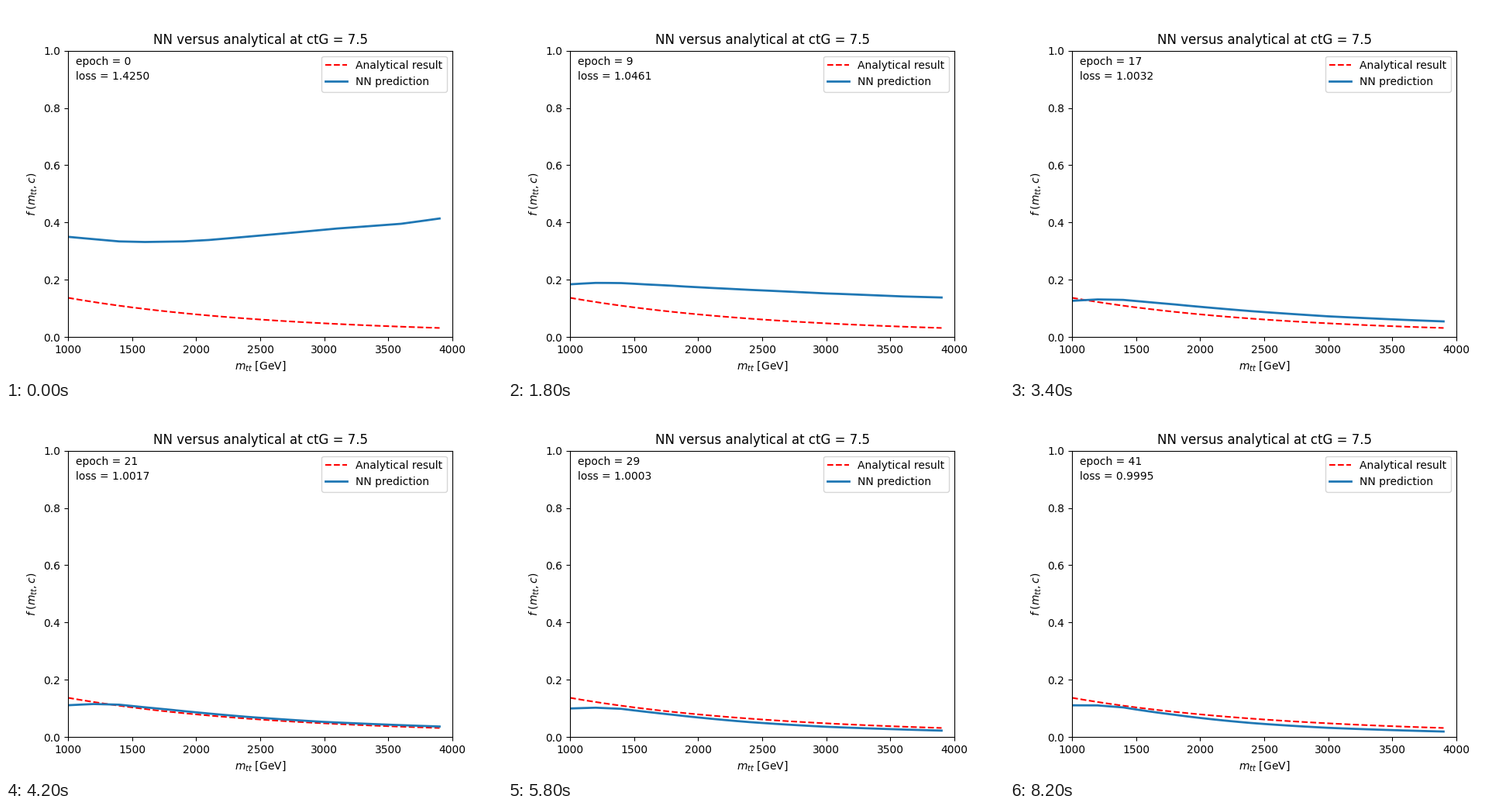
Recreate the animation shown at these times as a matplotlib script. Size 640 by 480 pixels, loop 8400 ms.

```python
import numpy as np
import matplotlib.pyplot as plt
from matplotlib.animation import FuncAnimation

EPOCHS = 42
STEP_MS = 200
LOSS_FLOOR = 0.99

mass = np.arange(1000, 4000, 100.0)
u = (mass - 1000) / 1000


def log_interp(x, xk, yk):
    return np.interp(x, xk, np.log(yk))


analytical = 0.1372 * np.exp(-0.572 * u + 0.0235 * u ** 2)

# Untrained and trained network: straight pieces, as from ReLU units
untrained = log_interp(mass, [1000, 1400, 1600, 1900, 2100, 3100, 3600, 3900],
                       [0.350, 0.334, 0.332, 0.334, 0.339, 0.379, 0.3956, 0.414])
trained = log_interp(mass, [1000, 1200, 1400, 1800, 2400, 3000, 3900],
                     [0.1107, 0.1104, 0.1034, 0.0777, 0.0490, 0.0322, 0.0193])


def prediction(epoch):
    """Fade from untrained to trained; low masses overshoot on the way."""
    remaining = np.exp(-0.043 * epoch - 6.8e-5 * epoch ** 3)
    overshoot = 0.265 * np.exp(-u) * np.sin(np.pi * (epoch / (EPOCHS - 1)) ** 0.7)
    return np.exp(trained + remaining * (untrained - trained) - overshoot)


def loss(epoch):
    above = np.array([1.4250, 1.1624, 1.0461, 1.0032, 1.0003, 1.0004, 0.9995]) - LOSS_FLOOR
    return LOSS_FLOOR + np.exp(log_interp(epoch, [0, 4, 9, 17, 25, 33, 41], above))


fig, ax = plt.subplots(figsize=(6.4, 4.8), dpi=100)
ax.plot(mass, analytical, "r--", label="Analytical result")
line, = ax.plot(mass, prediction(0), lw=2, color="C0", label="NN prediction")
epoch_text = ax.text(0.02, 0.95, "", transform=ax.transAxes)
loss_text = ax.text(0.02, 0.90, "", transform=ax.transAxes)
ax.set(xlim=(1000, 4000), ylim=(0, 1),
       xlabel=r"$m_{tt}$ [GeV]", ylabel=r"$f\;(m_{tt}, c)$",
       title="NN versus analytical at ctG = 7.5")
ax.legend(loc="upper right")


def update(epoch):
    line.set_ydata(prediction(epoch))
    epoch_text.set_text(f"epoch = {epoch}")
    loss_text.set_text(f"loss = {loss(epoch):.4f}")
    return line, epoch_text, loss_text


anim = FuncAnimation(fig, update, frames=EPOCHS, interval=STEP_MS,
                     repeat=True, repeat_delay=0)
plt.show()
```
